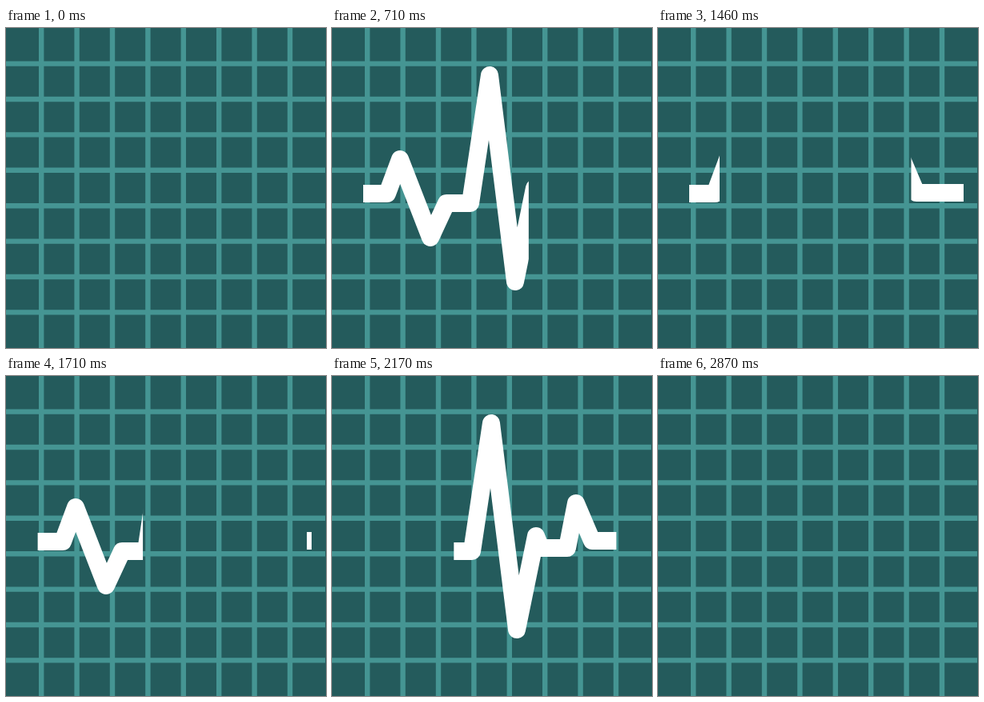
These frames come from a looping animation (400x400 px, 2960 ms). An HTML page:

```html
<!DOCTYPE html>
<html lang="en">
<head>
<meta charset="utf-8">
<title>Heartbeat</title>
<style>
  html, body { margin: 0; width: 100%; height: 100%; overflow: hidden; background: #245b5c; }
  svg { display: block; width: 100%; height: 100%; }
  #grid { stroke: #459593; stroke-width: 6.4; }
  #pulse { fill: none; stroke: #fff; stroke-width: 22; stroke-linejoin: round; }
</style>
</head>
<body>
<svg viewBox="0 0 400 400">
  <defs>
    <path id="pulse" d="M30 207H69L85 164L123 262L143 219H173L197 59L229 317L253 200L259 215H292L303 159L323 206H382"/>
    <clipPath id="clip0"><rect y="0" height="400"/></clipPath>
    <clipPath id="clip1"><rect y="0" height="400"/></clipPath>
  </defs>
  <path id="grid"/>
  <g clip-path="url(#clip0)"><use href="#pulse"/></g>
  <g clip-path="url(#clip1)"><use href="#pulse" x="2"/></g>
</svg>
<script>
const LOOP = 2960, TICK = 1000 / 24, SWEEP = 30, LEFT = 39;

// Head and tail start, travel and visible span, counted in ticks and pixels
const beats = [
  { head: 0, tail: 14, from: 28, to: 383, show: 5, hide: 44 },
  { head: 28.07, tail: 40.07, from: 39, to: 384.3, show: 29, hide: 69 }
];
const wipes = document.querySelectorAll('clipPath rect');

let grid = '';
for (let i = 0; i < 8; i++) {
  const step = i * 44.4;
  grid += `M${44.2 + step} 0V400M0 ${44.6 + step}H399`;
}
document.getElementById('grid').setAttribute('d', grid);

// cubic-bezier(.42, 0, .58, 1)
function ease(p) {
  if (p <= 0) return 0;
  if (p >= 1) return 1;
  let lo = 0, hi = 1;
  for (let i = 0; i < 24; i++) {
    const u = (lo + hi) / 2;
    if (u * (1.26 + u * (0.52 * u - 0.78)) < p) lo = u; else hi = u;
  }
  return lo * lo * (3 - 2 * lo);
}

function edge(beat, start, tick) {
  const x = beat.from + (beat.to - beat.from) * ease((tick - start) / SWEEP);
  return Math.max(LEFT, x);
}

function draw(now) {
  const ms = Math.floor((now % LOOP) / 10) * 10;
  const tick = Math.floor((ms + 5.1) / TICK);
  beats.forEach((beat, i) => {
    const on = tick >= beat.show && tick < beat.hide;
    const tail = edge(beat, beat.tail, tick);
    const head = edge(beat, beat.head, tick);
    wipes[i].setAttribute('x', tail);
    wipes[i].setAttribute('width', on ? head - tail : 0);
  });
}

const begin = performance.now();
function loop() {
  draw(performance.now() - begin);
  requestAnimationFrame(loop);
}
loop();
</script>
</body>
</html>
```
